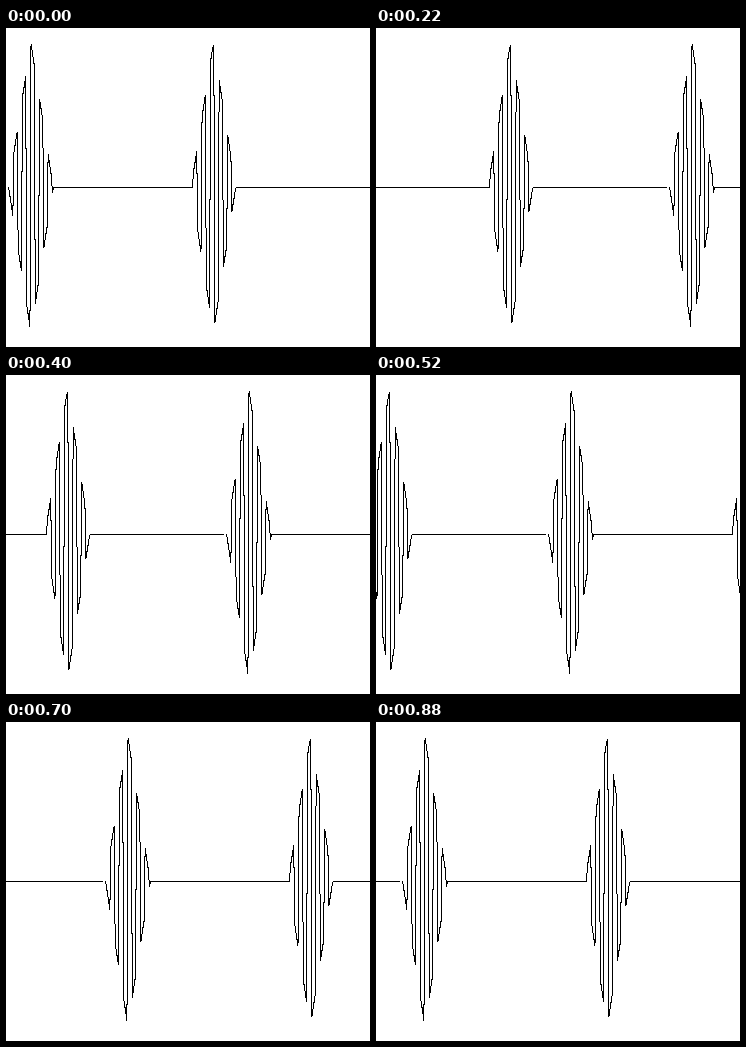
A matplotlib script that plays this animation: 364x319 px, repeating every 0.94 s.

```python
import numpy as np
import matplotlib.pyplot as plt
from matplotlib.animation import FuncAnimation

W, H, DPI = 364, 319, 100
BASE = 159                    # resting line
X0, DX = 2.06, 1.069          # sample grid in pixels
HALF, SLOPE = 20.85, 6.93     # triangular envelope, in samples and pixels
STEPS, TICK = 15, 20


def pulse(first, last, centre):
    """Square wave of four samples per half period under a triangle."""
    m = np.arange(first - 1, last + 2)
    env = SLOPE * (HALF - np.abs(m - centre))
    env[[0, -1]] = 0
    sign = -(-1.0) ** ((m - 1) // 4)
    return list(zip(X0 + DX * m, BASE - sign * env))


def draw_line(img, points):
    """One-pixel polyline without smoothing, with sub-pixel ends."""
    for (xa, ya), (xb, yb) in zip(points[:-1], points[1:]):
        n = int(2 * max(abs(xb - xa), abs(yb - ya))) + 2
        x = np.floor(np.linspace(xa, xb, n) + 0.5).astype(int)
        y = np.floor(np.linspace(ya, yb, n) + 0.5).astype(int)
        img[y, x] = 0


def make_wave():
    img = np.full((H, W), 255, dtype=np.uint8)
    path = pulse(1, 41, 20.85) + pulse(173, 212, 191.6)
    draw_line(img, path + [(W - 1, BASE)])
    return img


wave = make_wave()
fig = plt.figure(figsize=(W / DPI, H / DPI), dpi=DPI, facecolor="white")
picture = fig.figimage(wave, 0, 0, cmap="gray", vmin=0, vmax=255, origin="upper")


def update(n):
    # the first pose holds 100 ms, every other one 60 ms
    step = 0 if n < 5 else 1 + (n - 5) // 3
    picture.set_data(np.roll(wave, -round(W * step / STEPS), axis=1))
    return [picture]


anim = FuncAnimation(fig, update, frames=47, interval=TICK, repeat=True,
                     repeat_delay=0, blit=False)
plt.show()
```
